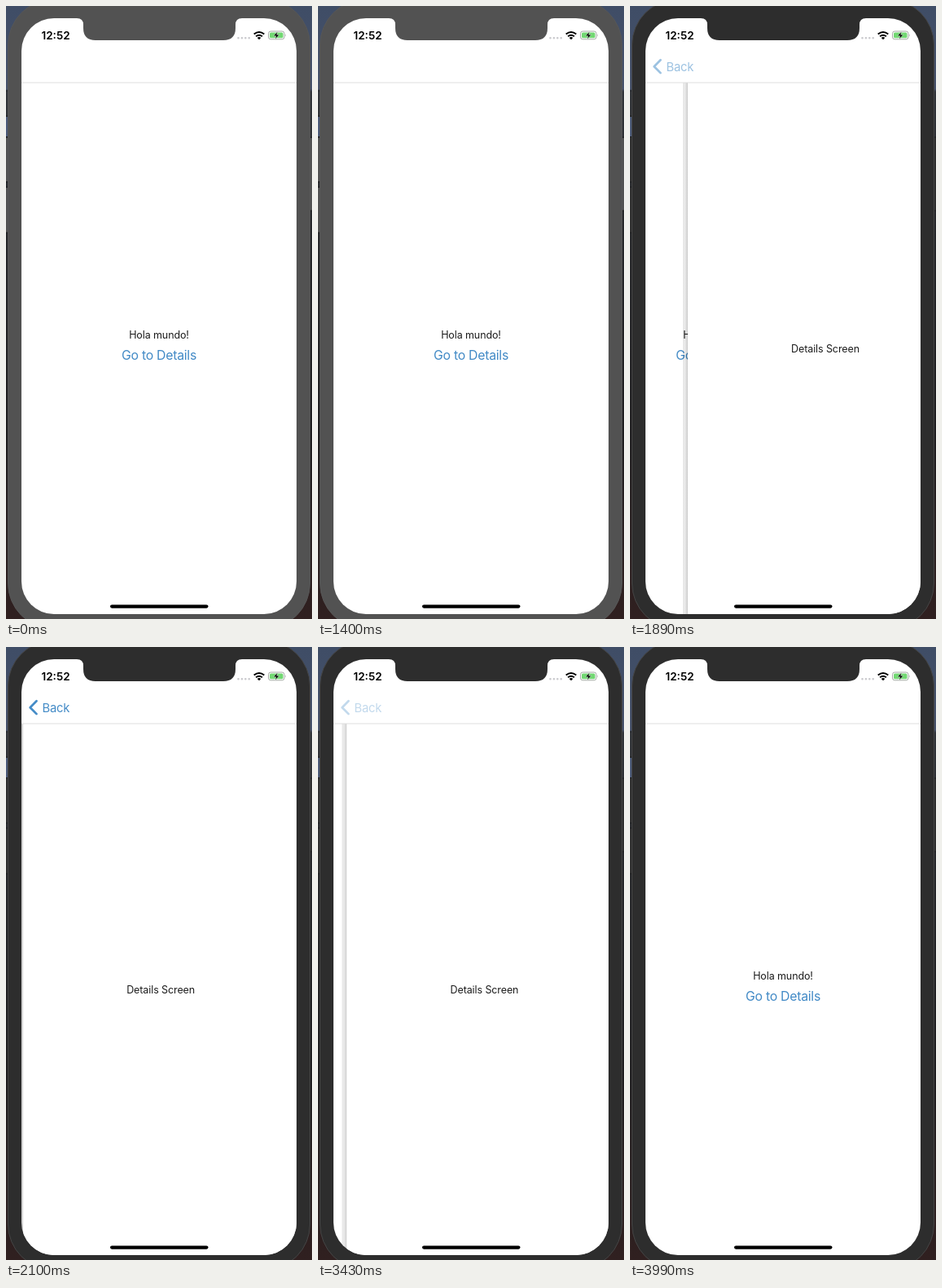
Recreate the animation shown at these times as an HTML page. Size 376 by 752 pixels, loop 4.55 s.

```html
<!DOCTYPE html>
<html lang="en">
<head>
<meta charset="utf-8">
<title>Screen transition</title>
<style>
@property --p { syntax: "<number>"; inherits: true; initial-value: 0; }
@property --link { syntax: "<number>"; inherits: true; initial-value: 1; }
@property --back { syntax: "<number>"; inherits: true; initial-value: 1; }

html, body { margin: 0; width: 100%; height: 100%; overflow: hidden; background: #1b1b1d; }

#stage {
  --bezel: #525252;
  --rim: #575757;
  display: block;
  width: 376px;
  height: 752px;
  font-family: Inter, Roboto, sans-serif;
  animation: 4550ms linear infinite;
  animation-name: focus, slide, tap-link, tap-back;
}

/* The window gains focus at 1470 ms. */
@keyframes focus {
  0%, 32.3% { --bezel: #525252; --rim: #575757; animation-timing-function: step-end; }
  32.301%, 100% { --bezel: #2d2d2d; --rim: #454545; }
}
/* Push from 1725 ms, pop from 3423 ms, 500 ms each. */
@keyframes slide {
  0% { --p: 0; }
  37.912% { --p: 0; animation-timing-function: cubic-bezier(.2833, .99, .31833, .99); }
  48.901% { --p: 1; }
  75.231% { --p: 1; animation-timing-function: cubic-bezier(.2833, .99, .31833, .99); }
  86.22%, 100% { --p: 0; }
}
@keyframes tap-link {
  0%, 36.4% { --link: 1; }
  37.8% { --link: .5; }
  41%, 100% { --link: 1; }
}
@keyframes tap-back {
  0%, 68.8% { --back: 1; }
  72.3%, 74.2% { --back: .2; }
  79.6%, 100% { --back: 1; }
}

.bezel { fill: var(--bezel); }
.rim { fill: var(--bezel); stroke: var(--rim); }
.home { transform: translateX(calc(var(--p) * -101.4px)); }
.details { transform: translateX(calc((1 - var(--p)) * 338px)); }
.shadow { opacity: clamp(0, (var(--p) - .03) * 12, 1); }
.back { opacity: calc(var(--back) * clamp(0, (var(--p) - .68) / .32, 1)); }
.link { fill: #428ac6; font-size: 15.8px; letter-spacing: -.25px; opacity: var(--link); }
.body { fill: #1c1c1c; font-size: 12.5px; letter-spacing: -.1px; }
.mid { text-anchor: middle; }
</style>
</head>
<body>
<svg id="stage" viewBox="0 0 376 752">
  <defs>
    <linearGradient id="desk" x2="0" y2="1">
      <stop offset="0" stop-color="#3f4d66"/>
      <stop offset=".135" stop-color="#46516a"/>
      <stop offset=".14" stop-color="#303338"/>
      <stop offset=".36" stop-color="#242528"/>
      <stop offset=".7" stop-color="#1c1b1d"/>
      <stop offset="1" stop-color="#302020"/>
    </linearGradient>
    <linearGradient id="edge">
      <stop offset="0" stop-opacity=".1"/>
      <stop offset=".4" stop-opacity=".08"/>
      <stop offset="1" stop-opacity=".2"/>
    </linearGradient>
    <clipPath id="screen"><rect x="19" y="15" width="338" height="731" rx="40"/></clipPath>
  </defs>

  <rect width="376" height="752" fill="url(#desk)"/>
  <path d="M0 136h4v24H0z" fill="#4b5a78"/>
  <path d="M0 162h4v53H0zM0 223h4v55H0zM372 162h4v89h-4z" class="bezel"/>
  <path d="M0 104h3M0 135h3M0 160.500h3M0 216h3M0 222h3M0 278h3M373 161h3M373 251h3" stroke="#1a1a1a"/>
  <rect x="2.500" y="-8" width="371" height="772" rx="56" class="rim"/>

  <g clip-path="url(#screen)">
    <rect x="19" y="15" width="338" height="731" fill="#fff"/>
    <g class="home mid">
      <text x="188" y="407.500" class="body">Hola mundo!</text>
      <text x="188" y="433.500" class="link">Go to Details</text>
    </g>
    <g class="details mid">
      <rect x="13" y="94" width="6" height="652" fill="url(#edge)" class="shadow"/>
      <rect x="19" y="94" width="338" height="652" fill="#fff"/>
      <text x="188" y="424.500" class="body">Details Screen</text>
    </g>
    <path d="M19 94h338" stroke="#dedede"/>
    <g class="back" fill="#428ac6">
      <path d="M37.500 66.300 29.700 74.200l7.800 7.900" fill="none" stroke="#428ac6" stroke-width="2.700" stroke-linecap="round" stroke-linejoin="round"/>
      <text x="44.500" y="79.600" font-size="14.800" letter-spacing="-.25">Back</text>
    </g>
    <rect x="128" y="734.500" width="120.500" height="4.200" rx="2.100"/>
  </g>

  <path d="M87 14v1q8 0 8 8v4q0 15 15 15h157q15 0 15-15v-4q0-8 8-8v-1z" class="bezel"/>
  <text x="43.500" y="40.500" font-size="13.500" font-weight="600">12:52</text>
  <path d="M285.500 39.300h13.600" stroke="#c9c9cd" stroke-width="2.600" stroke-linecap="round" stroke-dasharray="0 4.400"/>
  <g fill="none" stroke="#000" stroke-width="2">
    <path d="M304.700 34.600q6.300-5.200 12.600 0M307.100 37.300q3.900-3.200 7.800 0"/>
  </g>
  <path d="M308.700 39q2.300-1.800 4.600 0l-2.300 2.300z"/>
  <rect x="322.500" y="31" width="19.500" height="9.800" rx="2.800" fill="#fff" stroke="#a5aba5"/>
  <rect x="324" y="32.500" width="16.500" height="6.800" rx="1.500" fill="#72d873"/>
  <path d="M343.300 34.200q1.500 1.700 0 3.400z" fill="#a5aba5"/>
  <path d="M333.600 31.300 328.800 36.700h3l-1 4 4.900-5.500h-3z" stroke="#fff" stroke-width=".4"/>
</svg>
<script>
const STEP = 70, LOOP = 4550;
const start = performance.now();
const animations = document.getElementById("stage").getAnimations();
animations.forEach(a => a.pause());

function draw() {
  const time = (performance.now() - start) % LOOP;
  const tick = Math.floor(time / STEP) * STEP;
  animations.forEach(a => { a.currentTime = tick; });
  requestAnimationFrame(draw);
}
draw();
</script>
</body>
</html>
```
